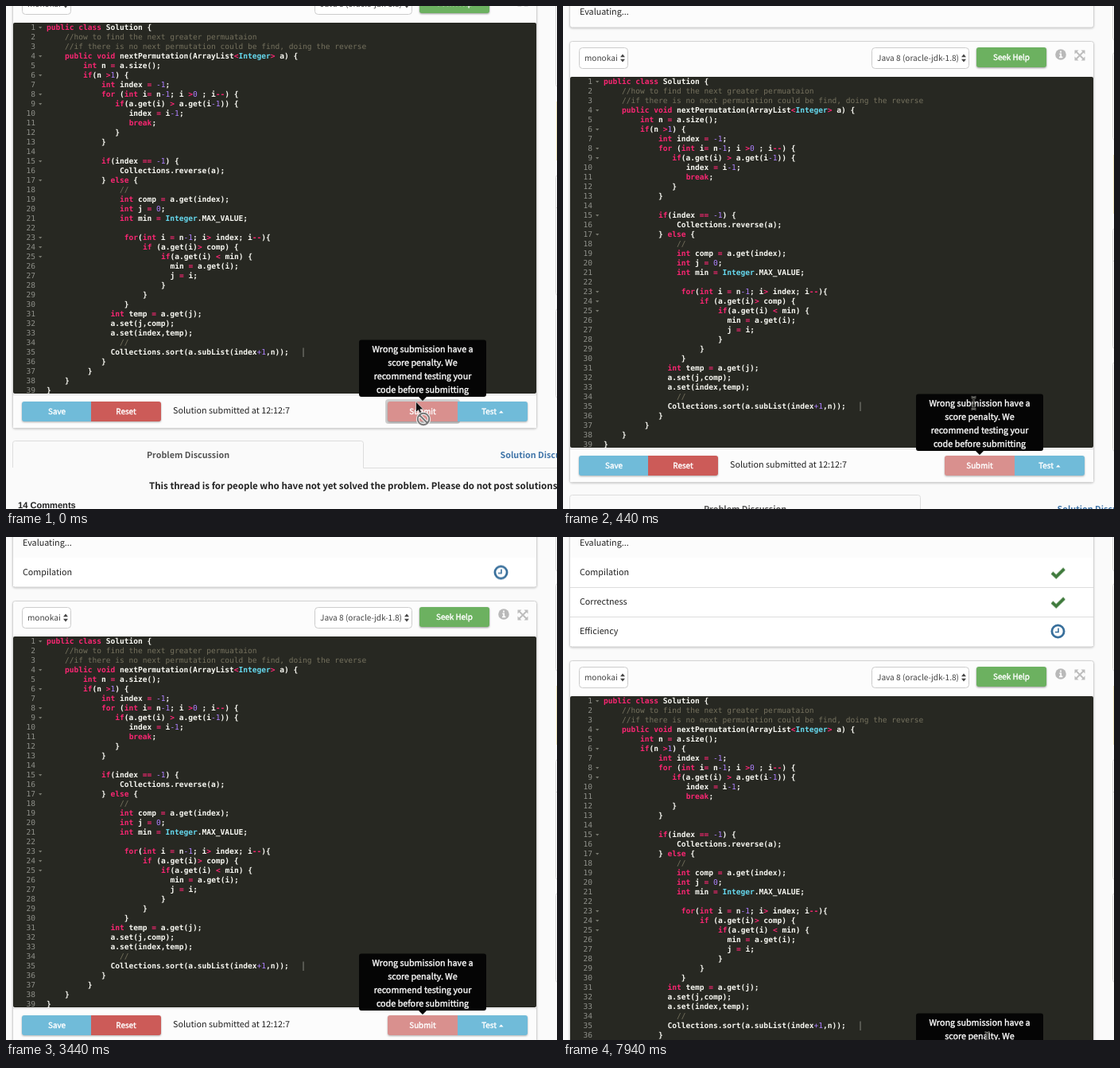
An HTML page that plays this animation: 693x632 px, repeating every 8 s.

```html
<!DOCTYPE html>
<html lang="en">
<head>
<meta charset="utf-8">
<title>Code submission</title>
<style>
html, body { margin: 0; width: 100%; height: 100%; overflow: hidden; background: #fafafa; }
svg { display: block; width: 693px; height: 632px; text-rendering: geometricPrecision; }
text { font-family: 'Noto Sans CJK JP', 'Noto Sans CJK SC', 'Noto Sans CJK', 'Open Sans', sans-serif; font-size: 10.75px; fill: #222; }
.mid { text-anchor: middle; }
.small { font-size: 10.1px; fill: #444; }
.btn text { font-size: 9.85px; fill: #fff; stroke: #fff; stroke-width: .4px; text-anchor: middle; }
.tip text { fill: #fff; stroke: #fff; stroke-width: .35px; text-anchor: middle; }
.bold { font-weight: 700; }
.box { fill: #fff; stroke: #ccc; }
.card { fill: #fcfcfc; stroke: #d4d4d4; filter: drop-shadow(0 1px 1px rgba(0,0,0,.18)); }
.line { fill: none; stroke: #ddd; }
.check { fill: none; stroke: #3f7a3c; stroke-width: 4; }
.clock { fill: none; stroke: #386f9b; stroke-width: 2.8; }
.clock path { stroke-width: 1.6; }

#code text { font-family: 'DejaVu Sans Mono', 'Liberation Mono', monospace; font-size: 9.563px; white-space: pre; fill: #f8f8f2; font-weight: 700; }
#code .no { fill: #8f908a; font-weight: 400; text-anchor: end; }
#code .note { fill: #75715e; font-weight: 400; }
#code .key { fill: #f92672; }
#code .type { fill: #66d9ef; }
#code .num { fill: #ae81ff; font-weight: 400; }

.page, .rows, .side, .beam, .arrow, .ring, .patch, .t2, .t3, .t4, .u3, .u4 {
  animation: 8s step-end infinite;
}
.page { animation-name: page; }
.rows { animation-name: rows; }
.side { animation-name: side; }
.beam { animation-name: beam; }
.arrow, .ring { animation-name: early; }
.patch { animation-name: patch; }
.t2 { animation-name: show2; }
.t3 { animation-name: show3; }
.t4 { animation-name: show4; }
.u3 { animation-name: hide3; }
.u4 { animation-name: hide4; }

@keyframes page {
  0% { transform: translateY(21px); }
  1.875% { transform: translateY(54px); }
  3.625% { transform: translateY(87px); }
  5.5% { transform: translateY(89px); }
  26.125% { transform: translateY(125px); }
  52.375% { transform: translateY(162px); }
  76.75%, 100% { transform: translateY(200px); }
}
@keyframes rows {
  0% { transform: translateY(-68px); }
  1.875% { transform: translateY(-35px); }
  3.625% { transform: translateY(-2px); }
  5.5%, 100% { transform: none; }
}
@keyframes side {
  0% { transform: translateY(-67px); }
  1.875% { transform: translateY(-33px); }
  3.625%, 100% { transform: none; }
}
@keyframes beam {
  0% { transform: translate(516.5px, 499px); opacity: 0; }
  5.5% { transform: translate(516.5px, 499px); opacity: 1; }
  7.375% { transform: translate(412.5px, 461px); opacity: 1; }
  9.25% { transform: translate(373.5px, 442px); opacity: 1; }
  13% { transform: translate(157.5px, 434px); opacity: 1; }
  14.875% { transform: translate(55.5px, 426px); opacity: 1; }
  43% { transform: translate(55.5px, 426px); opacity: 0; }
  99.25%, 100% { transform: translate(533.5px, 630px); opacity: 1; }
}
@keyframes early { 0% { opacity: 1; } 5.5%, 100% { opacity: 0; } }
@keyframes patch { 0% { opacity: 0; } 7.375% { opacity: 1; } 26.125%, 100% { opacity: 0; } }
@keyframes show2 { 0% { opacity: 0; } 26.125%, 100% { opacity: 1; } }
@keyframes show3 { 0% { opacity: 0; } 52.375%, 100% { opacity: 1; } }
@keyframes show4 { 0% { opacity: 0; } 76.75%, 100% { opacity: 1; } }
@keyframes hide3 { 0% { opacity: 1; } 52.375%, 100% { opacity: 0; } }
@keyframes hide4 { 0% { opacity: 1; } 76.75%, 100% { opacity: 0; } }
</style>
</head>
<body>
<svg viewBox="0 0 693 632">
  <defs>
    <g id="clock" class="clock"><circle cx="622.5" r="7.6"/><path d="M623 -4V1H619"/></g>
    <path id="check" class="check" d="M615 0.5L620.3 5.5L630.5 -4.5"/>
    <path id="pick" fill="#444" d="M-3 -1.2L0 -5L3 -1.2ZM-3 1.2L0 5L3 1.2Z"/>
    <path id="ibeam" fill="none" d="M-3 -7.5Q0 -7.5 0 -5V5Q0 7.5 -3 7.5M3 -7.5Q0 -7.5 0 -5V5Q0 7.5 3 7.5M-2 2.5H2"/>
  </defs>

  <g class="side">
    <g fill="#fff" stroke="#d6d6d6">
      <rect x="691.5" y="-40" width="40" height="83" rx="3"/>
      <rect x="691.5" y="58.5" width="40" height="110" rx="3"/>
      <rect x="691.5" y="279.5" width="40" height="151" rx="3"/>
      <path d="M692 320.5H693"/>
      <rect x="691.5" y="447.5" width="40" height="112" rx="3"/>
    </g>
    <rect x="692.5" y="187.5" width="40" height="73" fill="#fcf8e3" stroke="#efe6bd"/>
  </g>

  <!-- y = 0 is the top edge of the editor -->
  <g class="page">
    <rect class="card" x="8.5" y="-300" width="659" height="238" rx="3"/>

    <rect class="card" x="8.5" y="-44.5" width="659" height="554" rx="3"/>
    <rect class="box" x="20.5" y="-36.5" width="61" height="26" rx="4"/>
    <text class="small" x="27" y="-20">monokai</text>
    <use href="#pick" x="75" y="-23.5"/>
    <rect class="box" x="388.5" y="-36.5" width="122" height="26" rx="4"/>
    <text class="small" x="395" y="-20">Java 8 (oracle-jdk-1.8)</text>
    <use href="#pick" x="504" y="-23.5"/>
    <g class="btn">
      <rect x="520" y="-37" width="88" height="25" rx="3" fill="#6cb160" style="filter:drop-shadow(0 1px 1px rgba(0,0,0,.4))"/>
      <text x="564" y="-21">Seek Help</text>
    </g>
    <circle cx="626" cy="-28" r="6.8" fill="#b9b9b9"/>
    <path d="M626 -32.4V-30.4M624.4 -28.6H626.2V-24.6M624 -24.6H628.4" fill="none" stroke="#fff" stroke-width="1.7"/>
    <g fill="#bdbdbd">
      <path d="M645 -32L655 -22M655 -32L645 -22" stroke="#bdbdbd" stroke-width="1.8"/>
      <path d="M643.5 -33.5H648.5L643.5 -28.5ZM656.5 -33.5V-28.5L651.5 -33.5ZM643.5 -20.5V-25.5L648.5 -20.5ZM656.5 -20.5H651.5L656.5 -25.5Z"/>
    </g>

    <rect x="9" y="0" width="658" height="466" rx="2" fill="#272822"/>
    <rect class="patch" x="408" y="409" width="40" height="10" fill="#1f201c"/>
    <g id="code"></g>
    <path d="M374 408.5V420" stroke="#85857f"/>

    <rect x="9" y="466" width="658" height="43" fill="#fcfcfc"/>
    <path class="line" d="M9 467.5H667"/>
    <rect class="ring" x="477" y="473" width="94" height="31" rx="4" fill="#cfcfcf"/>
    <g class="btn">
      <g style="filter:drop-shadow(0 1px 1px rgba(0,0,0,.3))">
        <path d="M107 476H23a3 3 0 0 0-3 3v19a3 3 0 0 0 3 3h84z" fill="#70bbd9"/>
        <path d="M107 476h85a3 3 0 0 1 3 3v19a3 3 0 0 1-3 3h-85z" fill="#cc5b58"/>
        <path d="M568 476H483a3 3 0 0 0-3 3v19a3 3 0 0 0 3 3h85z" fill="#d9908e"/>
        <path d="M568 476h85a3 3 0 0 1 3 3v19a3 3 0 0 1-3 3h-85z" fill="#70bbd9"/>
      </g>
      <text x="64" y="492">Save</text>
      <text x="151" y="492">Reset</text>
      <text x="524" y="492">Submit</text>
      <text x="607.5" y="492">Test</text>
      <path d="M620 490.5L622.8 487.5L625.6 490.5Z" fill="#fff"/>
    </g>
    <text x="210" y="491">Solution submitted at 12:12:7</text>

    <path class="line" d="M8.5 559V528.5q0 -3 3 -3H446.500q3 0 3 3V559.500H693"/>
    <text class="bold mid" x="229" y="547" style="fill:#555">Problem Discussion</text>
    <text class="bold" x="621.500" y="547" style="fill:#3f74a8">Solution Discussion</text>
    <text class="bold" x="180" y="586" style="font-size:11.52px">This thread is for people who have not yet solved the problem. Please do not post solutions</text>
    <text class="bold" x="15" y="610" style="font:700 11.1px 'Liberation Sans',sans-serif">14 Comments</text>

    <g class="tip">
      <path d="M447 398.500H601a3 3 0 0 1 3 3V467a3 3 0 0 1-3 3H529L524 475L519 470H447a3 3 0 0 1-3-3V401.500a3 3 0 0 1 3-3Z" fill="#050505"/>
      <text x="524" y="413.500">Wrong submission have a</text>
      <text x="524" y="430.500">score penalty. We</text>
      <text x="524" y="447.500">recommend testing your</text>
      <text x="524" y="464.500">code before submitting</text>
    </g>
  </g>

  <g class="rows">
    <text x="21" y="11">Evaluating...</text>
    <g class="t2">
      <rect x="9" y="26" width="658" height="36" fill="#fff"/>
      <text x="21" y="48">Compilation</text>
      <use class="u3" href="#clock" y="44.500"/>
      <use class="t3" href="#check" y="44.500"/>
    </g>
    <g class="t3">
      <rect x="9" y="62" width="658" height="37" fill="#fff"/>
      <path class="line" d="M9 63.500H667"/>
      <text x="21" y="85">Correctness</text>
      <use class="u4" href="#clock" y="81.500"/>
      <use class="t4" href="#check" y="81.500"/>
    </g>
    <g class="t4">
      <rect x="9" y="99" width="658" height="38" fill="#fff"/>
      <path class="line" d="M9 100.500H667"/>
      <text x="21" y="122">Efficiency</text>
      <use href="#clock" y="118.500"/>
    </g>
  </g>

  <g class="arrow">
    <path d="M515.500 497V510.500L518.600 507.700L520.800 512.500L523 511.500L520.900 506.800H525Z" fill="#111" stroke="#ddd" stroke-width=".8"/>
    <g fill="none">
      <path id="ban" d="M517.800 519a7.200 7.200 0 1 0 14.400 0a7.200 7.200 0 1 0-14.400 0M520 514L530 524" stroke="#f2f2f2" stroke-width="4"/>
      <path d="M517.800 519a7.200 7.200 0 1 0 14.400 0a7.200 7.200 0 1 0-14.400 0M520 514L530 524" stroke="#777" stroke-width="2"/>
    </g>
  </g>
  <g class="beam">
    <use href="#ibeam" stroke="#9a9a96" stroke-width="2.600"/>
    <use href="#ibeam" stroke="#22231e" stroke-width="1"/>
  </g>
</svg>
<script>
const source = `public class Solution {
    //how to find the next greater permuataion
    //if there is no next permutation could be find, doing the reverse
    public void nextPermutation(ArrayList<Integer> a) {
        int n = a.size();
        if(n >1) {
            int index = -1;
            for (int i= n-1; i >0 ; i--) {
               if(a.get(i) > a.get(i-1)) {
                  index = i-1;
                  break;
               }
            }

            if(index == -1) {
                Collections.reverse(a);
            } else {
                //
                int comp = a.get(index);
                int j = 0;
                int min = Integer.MAX_VALUE;

                 for(int i = n-1; i> index; i--){
                     if (a.get(i)> comp) {
                         if(a.get(i) < min) {
                           min = a.get(i);
                           j = i;
                         }
                     }
                 }
              int temp = a.get(j);
              a.set(j,comp);
              a.set(index,temp);
                //
              Collections.sort(a.subList(index+1,n));
            }
         }
    }
}`;

const CHAR = 5.757, LINE = 12, LEFT = 51;
const token = /(\/\/.*|\b(?:public|class|void|int|if|for|else|break|Integer)\b|[+-]?\b\d+|==|--|[=<>])/;
const code = document.getElementById('code');

function add(parent, tag, attrs, text = '') {
  const el = document.createElementNS('http://www.w3.org/2000/svg', tag);
  for (const key in attrs) el.setAttribute(key, attrs[key]);
  el.textContent = text;
  return parent.appendChild(el);
}

function kind(word) {
  if (word.startsWith('//')) return 'note';
  if (word === 'Integer') return 'type';
  return /\d/.test(word) ? 'num' : 'key';
}

source.split('\n').forEach((line, i) => {
  const y = i * LINE + 9;
  const body = line.trimStart();
  add(code, 'text', { class: 'no', x: 37, y }, i + 1);
  if (body.endsWith('{')) {
    add(code, 'path', { d: `M41 ${y - 4}h4.4l-2.2 2.6z`, fill: '#77786f' });
  }
  const row = add(code, 'text', { x: LEFT + (line.length - body.length) * CHAR, y });
  body.split(token).forEach((part, k) => {
    if (part) add(row, 'tspan', k % 2 ? { class: kind(part) } : {}, part);
  });
});
</script>
</body>
</html>
```
